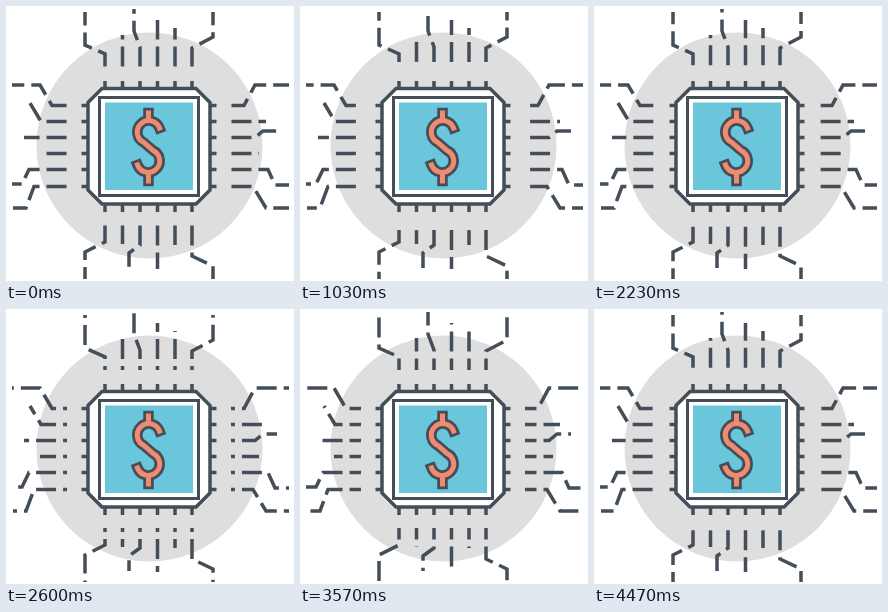
Animation, 288 px wide and 275 px high, one loop 4.51 s. Source, as an HTML page:

```html
<!DOCTYPE html>
<html lang="en">
<head>
<meta charset="utf-8">
<title>Digital money chip</title>
<style>
  html, body { margin: 0; width: 100%; height: 100%; overflow: hidden; background: #fff; }
  svg { display: block; width: 100vw; height: 100vh; }
  .ink { fill: none; stroke: #434e59; stroke-width: 3.500; }
  .traces {
    stroke-dasharray: 20 7;
    animation: flow 563.75ms linear infinite;
  }
  .sign { fill: none; stroke-linecap: square; }
  @keyframes flow {
    from { stroke-dashoffset: 26.5px; }
    to { stroke-dashoffset: 53.5px; }
  }
</style>
</head>
<body>
<svg viewBox="0 0 288 275">
  <defs>
    <path id="dollar" d="M142.500 107V114M142.500 168V175M153.500 122A11.500 11.500 0 1 0 138 136.600L147 144.400A11.500 11.500 0 1 1 131.500 159"/>
  </defs>
  <circle cx="143.500" cy="139.500" r="113" fill="#dedede"/>

  <!-- fixed pins around the chip -->
  <path class="ink" d="M99 75V206M116.500 75V206M134 75V206M151.500 75V206M169 75V206M186 75V206
    M75.500 99.500H210.500M75.500 115.500H210.500M75.500 131.500H210.500M75.500 147.500H210.500M75.500 163.500H210.500M75.500 180.500H210.500"/>

  <!-- every trace starts 21 units from the chip edge -->
  <g class="ink traces">
    <path d="M99 61V48L79 39V6"/>
    <path d="M116.500 61V29"/>
    <path d="M134 61V41L128 25V3"/>
    <path d="M151.500 61V14"/>
    <path d="M169 61V22"/>
    <path d="M186 61V42L207 31V6"/>

    <path d="M225 99.500H238L249 79H283"/>
    <path d="M225 115.500H260"/>
    <path d="M225 131.500H249L257 125H271"/>
    <path d="M225 147.500H253"/>
    <path d="M225 163.500H262L269 179H283"/>
    <path d="M225 180.500H247L260 202H283"/>

    <path d="M99 219V236L79 246V273"/>
    <path d="M116.500 219V238"/>
    <path d="M134 219V239L123 247V262"/>
    <path d="M151.500 219V263"/>
    <path d="M169 219V239"/>
    <path d="M186 219V250L207 260V273"/>

    <path d="M61 99.500H46L34 79H6"/>
    <path d="M61 115.500H35L24 97"/>
    <path d="M61 131.500H18"/>
    <path d="M61 147.500H34"/>
    <path d="M61 163.500H23L16 178H6"/>
    <path d="M61 180.500H28L20 202H7"/>
  </g>

  <path class="ink" style="fill:#fff" d="M96 82.500H190L204 96.500V184L190 198H96L82 184V96.500Z"/>
  <path class="ink" style="stroke-width:3" d="M93.500 91.500H192.500V189.500H93.500Z"/>
  <rect x="99" y="96.500" width="88" height="87.500" fill="#6ac6da"/>
  <use href="#dollar" class="sign" stroke="#434e59" stroke-width="10.500"/>
  <use href="#dollar" class="sign" stroke="#f08a70" stroke-width="5"/>
</svg>
</body>
</html>
```
